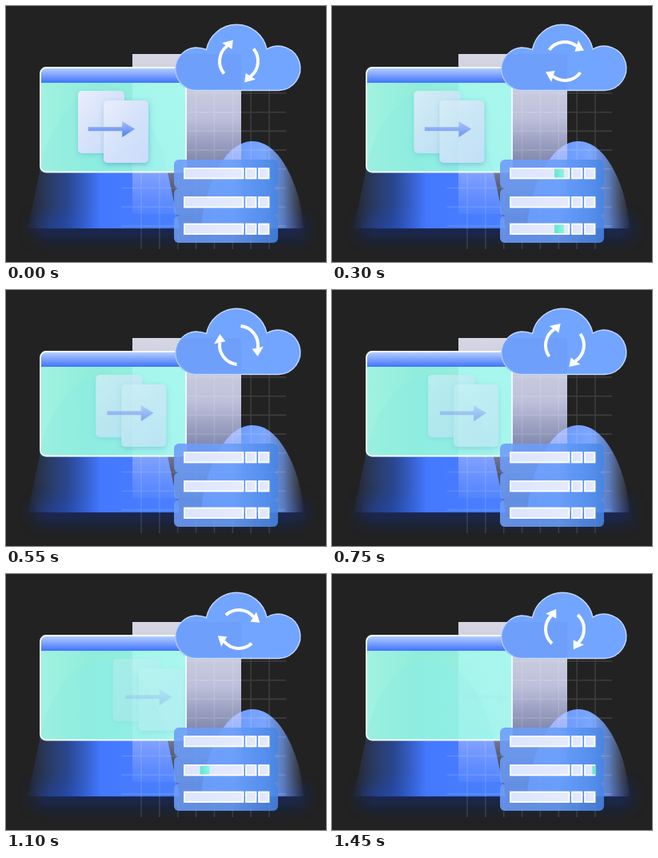
An HTML page for the animation above (1500 ms loop, 400 by 320 pixels).

```html
<!DOCTYPE html>
<html lang="en">
<head>
<meta charset="utf-8">
<title>File transfer</title>
<style>
  html, body { margin: 0; width: 100%; height: 100%; overflow: hidden; background: #222; }
  svg { display: block; width: 100vw; height: 100vh; }
</style>
</head>
<body>
<svg viewBox="0 0 400 320">
  <defs>
    <linearGradient id="hillL" gradientUnits="userSpaceOnUse" x1="27" x2="217" y1="0" y2="0">
      <stop offset="0" stop-color="#4a7dff" stop-opacity=".03"/>
      <stop offset=".25" stop-color="#2f62e0" stop-opacity=".55"/>
      <stop offset=".48" stop-color="#4478ff"/>
      <stop offset="1" stop-color="#4a80ff"/>
    </linearGradient>
    <linearGradient id="hillR" gradientUnits="userSpaceOnUse" x1="244" x2="372" y1="0" y2="0">
      <stop offset="0" stop-color="#5a8cff"/>
      <stop offset=".62" stop-color="#7ba6ff"/>
      <stop offset=".8" stop-color="#7099ee" stop-opacity=".75"/>
      <stop offset="1" stop-color="#8095c8" stop-opacity=".05"/>
    </linearGradient>
    <linearGradient id="sheet" x2="0" y2="1">
      <stop offset="0" stop-color="#e4e4f2" stop-opacity=".93"/>
      <stop offset=".4" stop-color="#d3d6f4" stop-opacity=".88"/>
      <stop offset=".7" stop-color="#b9c4ff" stop-opacity=".6"/>
      <stop offset="1" stop-color="#9db4ff" stop-opacity=".12"/>
    </linearGradient>
    <linearGradient id="title" x2="0" y2="1">
      <stop offset="0" stop-color="#b4ccff"/>
      <stop offset="1" stop-color="#4074fb"/>
    </linearGradient>
    <linearGradient id="mint">
      <stop offset="0" stop-color="#a6fbe9"/>
      <stop offset=".35" stop-color="#95f5e2"/>
      <stop offset="1" stop-color="#9df8ea"/>
    </linearGradient>
    <linearGradient id="doc" x2="1" y2="1">
      <stop offset="0" stop-color="#e9eefb"/>
      <stop offset=".5" stop-color="#d5e2fa"/>
      <stop offset="1" stop-color="#c9dcfb"/>
    </linearGradient>
    <linearGradient id="arrow" x2="0" y2="1">
      <stop offset="0" stop-color="#a9c2fa"/>
      <stop offset="1" stop-color="#4c7cee"/>
    </linearGradient>
    <linearGradient id="box">
      <stop offset="0" stop-color="#6d9cf8" stop-opacity=".88"/>
      <stop offset=".55" stop-color="#6a9ffa" stop-opacity=".88"/>
      <stop offset="1" stop-color="#4684e4" stop-opacity=".88"/>
    </linearGradient>
    <linearGradient id="slot">
      <stop offset="0" stop-color="#dce5ff"/>
      <stop offset="1" stop-color="#e6ebfb"/>
    </linearGradient>
    <linearGradient id="light">
      <stop offset="0" stop-color="#5fe6cf"/>
      <stop offset="1" stop-color="#8ef4e4"/>
    </linearGradient>
    <filter id="glow" x="-20%" y="-100%" width="140%" height="300%"><feGaussianBlur stdDeviation="10"/></filter>
    <filter id="soft" x="-30%" y="-30%" width="160%" height="160%">
      <feDropShadow dx="0" dy="2" stdDeviation="3" flood-color="#4a8fc0" flood-opacity=".3"/>
    </filter>
    <clipPath id="cells">
      <path d="M223 190H296.5V300H223zM300 190H313V300H300zM316 190H329.5V300H316z"/>
    </clipPath>
    <path id="bellL" d="M27 278L42 208C52 150 85 107 122 107C160 107 190 150 202 208L217 278z"/>
    <g id="turn">
      <path d="M-23.5-5A24 24 0 0 1 6-23.2" fill="none" stroke="#fff" stroke-width="4"/>
      <path d="M16.5-22L5-30.5L6.5-16z" fill="#fff"/>
    </g>
  </defs>

  <rect width="400" height="320" fill="#222"/>
  <rect x="36" y="264" width="338" height="26" fill="#0c2f92" opacity=".5" filter="url(#glow)"/>
  <use href="#bellL" fill="url(#hillL)"/>
  <path d="M244 278C246 235 270 169 308 169C346 169 370 235 372 278z" fill="url(#hillR)"/>
  <rect x="158" y="60" width="136" height="200" fill="url(#sheet)"/>
  <path id="grid" fill="none" stroke="#fff" stroke-opacity=".12" stroke-width="1.6"/>

  <rect x="43" y="77" width="182" height="130.5" rx="7" fill="url(#mint)" fill-opacity=".96"/>
  <use href="#bellL" fill="#5fcfc0" opacity=".1" clip-path="inset(0 0 70px 0)"/>
  <rect x="158" y="96" width="66" height="110" fill="#c8fbff" opacity=".22"/>
  <path d="M44 96V84a6 6 0 0 1 6-6H218a6 6 0 0 1 6 6V96z" fill="url(#title)"/>
  <rect x="43" y="77" width="182" height="130.5" rx="7" fill="none" stroke="#f4fffd" stroke-width="1.8"/>

  <g id="docs">
    <g fill="url(#doc)" filter="url(#soft)">
      <rect x="90" y="106" width="58" height="78" rx="5"/>
      <rect x="122" y="118" width="56" height="78" rx="5" filter="url(#soft)"/>
    </g>
  </g>
  <path id="go" d="M102.5 151H145V143.5L161.5 153.7L145 164.5V156.5H102.5z" fill="url(#arrow)" stroke="#dfe9ff" stroke-opacity=".6" stroke-width=".8"/>

  <path d="M237 105.5A26.8 26.8 0 0 1 237 52Q244.500 52 250.500 54.500A38.500 38.500 0 0 1 326 54A27.700 27.700 0 1 1 341 105.500z"
    fill="#72a5ff" stroke="#c3d8ff" stroke-width="1.400"/>
  <path d="M211 79Q212 67 220 60H294V105H237Q212 104 211 79z" fill="#5f86ea" opacity=".2"/>
  <g id="sync">
    <use href="#turn"/>
    <use href="#turn" transform="rotate(180)"/>
  </g>

  <g id="rack"></g>
  <g id="lights" clip-path="url(#cells)" fill="url(#light)"></g>
</svg>
<script>
  const LOOP = 1500, STEP = 50, LAG = 16;
  const $ = id => document.getElementById(id);

  function add(parent, attrs) {
    const el = document.createElementNS("http://www.w3.org/2000/svg", "rect");
    for (const k in attrs) el.setAttribute(k, attrs[k]);
    return parent.appendChild(el);
  }

  let lines = "";
  for (let i = 0; i < 8; i++) {
    lines += `M${169 + i * 22.86} 86V304M144 ${109 + i * 23.7}H350`;
  }
  $("grid").setAttribute("d", lines);

  // Each row: box top, box height, slot top, time its light sets off
  const rows = [[192, 36, 202, 0], [228, 34, 238, 950], [262, 34, 271.5, 0]];
  const lights = rows.map(([y, height, top, from]) => {
    add($("rack"), { x: 210, y, width: 130, height, rx: 6, fill: "url(#box)" });
    for (const [x, width] of [[223, 73.5], [300, 12.5], [316, 12.5]]) {
      add($("rack"), { x, y: top + 1, width, height: 12.5, fill: "url(#slot)", stroke: "#fff", "stroke-width": 1.8 });
    }
    return { from, el: add($("lights"), { y: top + 2, width: 12, height: 10.5 }) };
  });

  function draw(ms) {
    const t = Math.floor((ms % LOOP) / STEP) * STEP;
    const p = t ? (t + LAG) / LOOP : 0;
    const fade = 1 - p;

    $("docs").setAttribute("transform", `translate(${59 * p} 0)`);
    $("docs").setAttribute("opacity", fade);
    $("go").setAttribute("transform", `translate(${62.5 * p} 0)`);
    $("go").setAttribute("opacity", fade);
    $("sync").setAttribute("transform", `translate(291 69) rotate(${360 * p - 52})`);
    for (const { from, el } of lights) el.setAttribute("x", 207 + 0.237 * (t - from));
  }

  const start = performance.now();
  function tick() {
    draw(performance.now() - start);
    requestAnimationFrame(tick);
  }
  tick();
</script>
</body>
</html>
```
